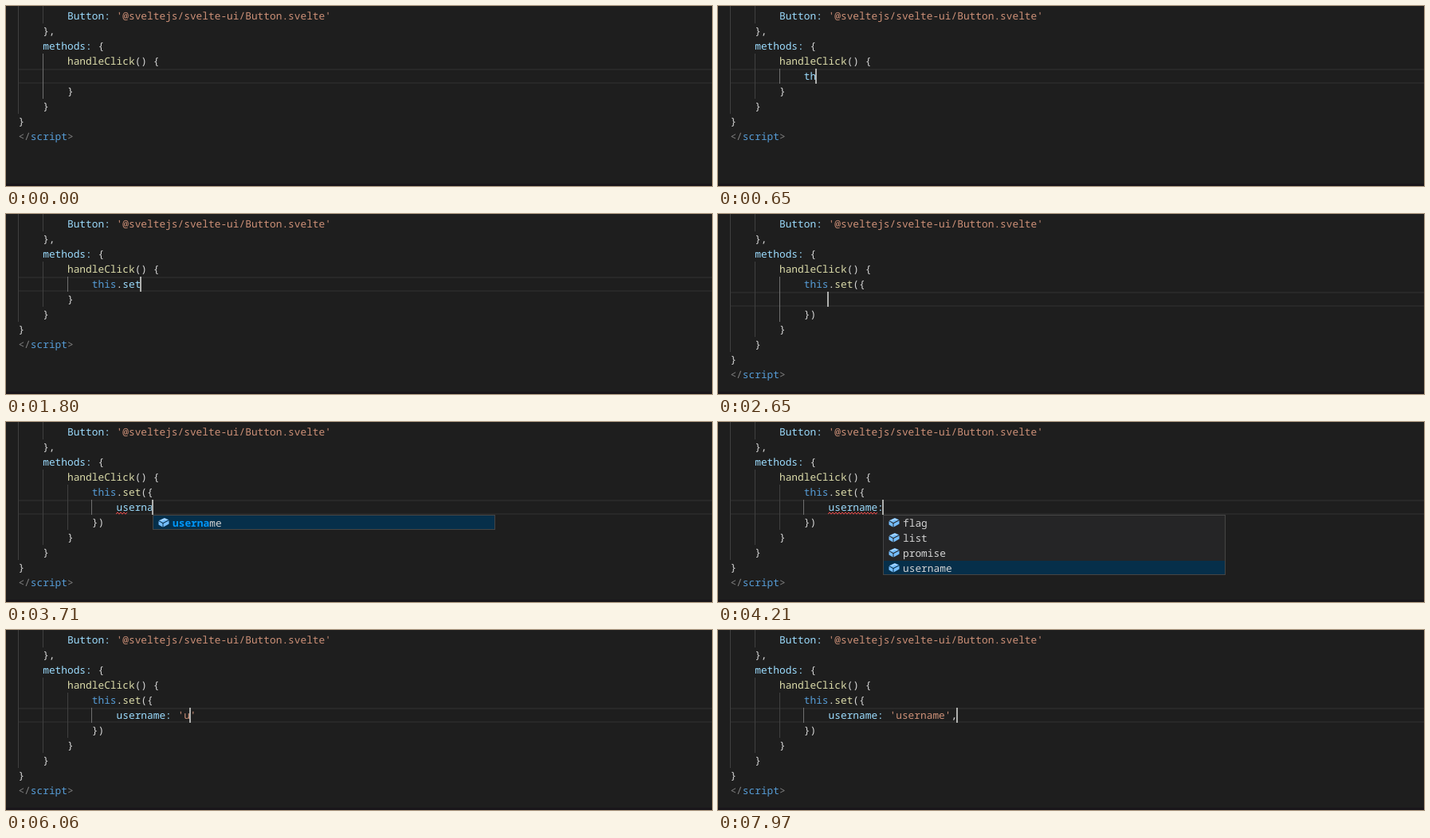
An HTML page that plays this animation: 886x227 px, repeating every 8000 ms.

```html
<!DOCTYPE html>
<html lang="en">
<head>
<meta charset="utf-8">
<title>Editor completion</title>
<style>
  html, body { margin: 0; width: 100%; height: 100%; overflow: hidden; background: #1e1e1e; }
  #stage {
    position: relative; width: 886px; height: 227px; overflow: hidden;
    font: 12.83px/19px "Noto Sans Mono", monospace; color: #d4d4d4;
    white-space: pre; text-rendering: geometricPrecision; font-variant-ligatures: none;
  }
  #stage div, #stage svg { position: absolute; box-sizing: border-box; }
  .current { left: 15px; right: 0; height: 19px; border: solid #282828; border-width: 2px 0; }
  .guide { width: 1px; background: #404040; }
  .guide.active { background: #707070; }
  .row { left: 15.4px; height: 19px; }
  .string { color: #ce9178; }
  .tag { color: #808080; }
  .keyword { color: #569cd6; }
  .call { color: #dcdcaa; }
  .name { color: #9cdcfe; }
  .caret { width: 2px; height: 19px; background: #aeafad; }
  .edge { left: 0; right: 0; top: 224px; height: 3px; background: #19161a; }
  .list, .docs { background: #252526; border: 1px solid #454545; overflow: hidden; }
  .item { left: 0; right: 0; height: 19px; padding-left: 24px; }
  .item.selected { background: #062f4a; }
  .item b { color: #0097fb; }
  .item svg { left: 5px; top: 1px; }
  .docs { width: 331px; height: 150px; color: #ccc; }
  .title { left: 5px; top: 4px; color: #9d9d9d; }
  .close { right: 10px; top: -1px; font-size: 15px; }
  .about { left: 5px; top: 40px; font: 12.63px/19px "Open Sans", sans-serif; }
</style>
</head>
<body>
<div id="stage"></div>
<script>
const LOOP = 8000, CHAR = 7.7, LINE = 19, LEFT = 15.4, TOP = 3;
const stage = document.getElementById('stage');
const colX = col => Math.floor(LEFT + col * CHAR + 0.01);
const rowY = row => TOP + row * LINE;
const indent = n => ' '.repeat(n);

const svg = body => `<svg width="16" height="16" viewBox="0 0 16 16" fill="none">${body}</svg>`;
const icons = {
  method: svg('<path d="M8 2l5.3 2.8v6.2L8 14l-5.3-3V4.8zM2.7 4.8L8 7.7l5.3-2.9M8 7.7V14" stroke="#b180d7" stroke-width="1.3"/>'),
  field: svg('<path d="M5 6V2h5l3 3v9H5v-2M10 2v3h3" stroke="#c5c5c5" stroke-width="1.2"/><path d="M2 4v5h6M6 6.5L8.5 9 6 11.5" stroke="#75beff" stroke-width="1.5"/>'),
  lines: svg('<path d="M2 4h6M10 4h4M2 8h3M7 8h7M2 12h7M11 12h3" stroke="#c5c5c5" stroke-width="1.4"/>'),
  value: svg('<path d="M1.5 6v4.5l5 3V9zM7.5 9v4.5l7-4V5.2z" fill="#75beff"/><path d="M1.8 5.2L8.8 2l5.4 2.2L7 8z" fill="#75beff"/><path d="M4.5 5.3l4.4-2 2.6 1" stroke="#c8e5ff"/>')
};

const members = [
  ['body', 'field'], ['fire', 'method'], ['get', 'method'], ['handleClick', 'method'],
  ['header', 'field'], ['ref:...', 'lines'], ['set', 'method']
];
const values = ['flag', 'list', 'promise', 'username'].map(name => [name, 'value']);
const about = `This updates the component's state with the new
values provided and causes the DOM to update.
State must be a plain old JavaScript object (POJO).
Any properties not included in state will remain as
they were.`;

// The last item of every list is the selected one.
const memberList = (col, items = members, match = 0) => ({ col, items, match, width: 331, docs: true });
const valueList = (col, items = values, match = 0) => ({ col, items, match, width: 430 });
const setOnly = members.slice(-1), userOnly = values.slice(-1);
const error = (row, col, length) => ({ row, col, length });

// "|" in the text marks the caret; without it the caret is hidden.
const steps = [
  [0, { text: '', open: false, popup: null, error: null }],
  [130, { text: '|' }],
  [460, { text: 't|' }],
  [580, { text: 'th|' }],
  [700, { text: 'thi|' }],
  [800, { text: 'this|' }],
  [900, { text: 'this.|' }],
  [960, { popup: memberList(17) }],
  [1010, { error: error(5, 8, 1) }],
  [1290, { text: 'this.s|', popup: memberList(18) }],
  [1340, { popup: memberList(18, setOnly, 1), error: null }],
  [1400, { text: 'this.se|', popup: memberList(19, setOnly, 2) }],
  [1800, { text: 'this.set|', popup: null }],
  [1850, { text: 'this.set(|)' }],
  [1900, { text: 'this.set({|})' }],
  [2310, { text: 'this.set({})' }],
  [2650, { text: '|', open: true }]
];

// Typing the key: the list follows each letter, its highlight comes a little later.
[3110, 3230, 3350, 3460, 3570, 3670, 3820, 3920].forEach((time, i) => {
  const n = i + 1, text = 'username'.slice(0, n) + '|';
  steps.push([time, i ? { text, popup: valueList(16 + n, userOnly, i) } : { text }]);
  steps.push([time + (n < 7 ? 40 : 50), { popup: valueList(16 + n, userOnly, n) }]);
});

steps.push(
  [3420, { error: error(5, 16, 2) }],
  [3760, { error: error(5, 16, 4) }],
  [4010, { error: error(5, 16, 8) }],
  [4150, { text: 'username:|', popup: null }],
  [4210, { popup: valueList(25) }],
  [4240, { error: error(6, 12, 1) }],
  [4520, { text: 'username: |', popup: valueList(26) }],
  [4590, { popup: null }],
  [4980, { text: 'username: ' }],
  [5320, { text: "username: '|'" }],
  [5370, { error: null }],
  [5780, { text: "username: ''" }]
);

[6060, 6210, 6300, 6400, 6490, 6580, 6760, 6820].forEach((time, i) =>
  steps.push([time, { text: `username: '${'username'.slice(0, i + 1)}|'` }]));

steps.push(
  [7150, { text: "username: 'username'|" }],
  [7610, { text: "username: 'username'" }],
  [7970, { text: "username: 'username',|" }]
);
steps.sort((a, b) => a[0] - b[0]);

const states = [];
for (const [time, change] of steps) states.push({ ...states.at(-1), ...change, time });

const kinds = ['string', 'tag', 'keyword', 'call', 'name'];
const highlight = code => code.replace(
  /('[^']*')|(<\/|>)|(\bthis\b|\bscript\b)|(\w+(?=\())|(\w+:?)/g,
  (token, ...groups) => {
    const kind = kinds[groups.slice(0, 5).findIndex(Boolean)];
    return `<span class="${kind}">${token.replace('<', '&lt;')}</span>`;
  });

const box = (name, x, y, style = '', body = '') =>
  `<div class="${name}" style="left:${x}px;top:${y}px;${style}">${body}</div>`;

function drawGuides(lines, current, emptyDepth) {
  const depths = lines.map((line, row) =>
    row === current && !line.trim() ? emptyDepth : line.search(/\S/) / 4);
  const active = depths[current] - 1;
  let html = '';
  depths.forEach((depth, row) => {
    for (let i = 0; i < depth; i++) {
      const name = i === active && row > 2 ? 'guide active' : 'guide';
      const y = row ? rowY(row) : 0;
      html += box(name, colX(i * 4), y, `height:${rowY(row + 1) - y}px`);
    }
  });
  return html;
}

function drawError({ row, col, length }) {
  const width = Math.round(length * CHAR);
  let path = 'M0 3.2';
  for (let x = 2, up = true; x <= width; x += 2, up = !up) path += `L${x} ${up ? 0.8 : 3.2}`;
  return `<svg style="left:${colX(col)}px;top:${rowY(row) + 15}px" width="${width}" height="4" fill="none">` +
    `<path d="${path}" stroke="#f14c4c"/></svg>`;
}

function drawPopup({ col, items, match, width, docs }, row) {
  const x = colX(col), y = rowY(row + 1);
  const list = items.map(([label, icon], i) => {
    const name = i === items.length - 1 ? 'item selected' : 'item';
    const text = match ? `<b>${label.slice(0, match)}</b>${label.slice(match)}` : label;
    return `<div class="${name}" style="top:${i * LINE}px">${icons[icon]}${text}</div>`;
  }).join('');
  let html = box('list', x, y, `width:${width}px;height:${items.length * LINE}px`, list);
  if (docs) {
    html += box('docs', x + width - 1, y, '',
      `<div class="title">[Svelte] set({...})</div><div class="close">×</div><div class="about">${about}</div>`);
  }
  return html;
}

function draw({ text, open, popup, error }) {
  const code = text.replace('|', ''), caret = text.indexOf('|');
  const row = open ? 5 : 4, start = open ? 16 : 12;
  const typed = indent(start) + code;
  const lines = [
    indent(8) + "Button: '@sveltejs/svelte-ui/Button.svelte'",
    indent(4) + '},',
    indent(4) + 'methods: {',
    indent(8) + 'handleClick() {',
    ...(open ? [indent(12) + 'this.set({', typed, indent(12) + '})'] : [typed]),
    indent(8) + '}',
    indent(4) + '}',
    '}',
    '<\/script>'
  ];
  let html = `<div class="current" style="top:${rowY(row)}px"></div>`;
  html += drawGuides(lines, row, start / 4 - 1);
  lines.forEach((line, i) => {
    html += `<div class="row" style="top:${rowY(i)}px">${highlight(line)}</div>`;
  });
  if (error) html += drawError(error);
  if (caret >= 0) html += box('caret', colX(start + caret) - 1, rowY(row));
  html += '<div class="edge"></div>';
  if (popup) html += drawPopup(popup, row);
  stage.innerHTML = html;
}

const began = performance.now();
let shown = null;
function tick() {
  const time = (performance.now() - began) % LOOP;
  const state = states.findLast(s => s.time <= time);
  if (state !== shown) draw(shown = state);
  requestAnimationFrame(tick);
}
tick();
</script>
</body>
</html>
```
